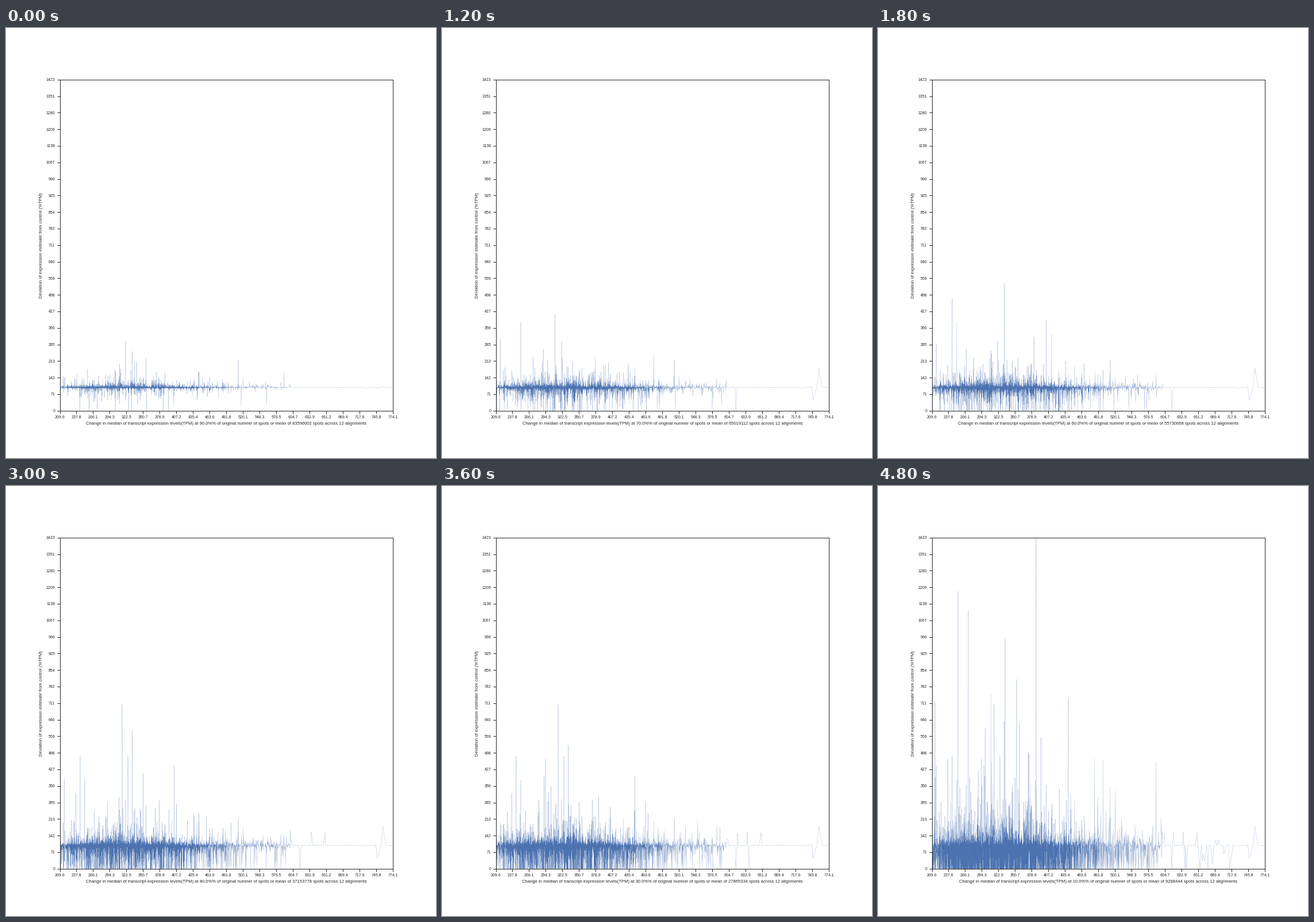
Recreate the animation shown at these times as a matplotlib script. Size 748 by 748 pixels, loop 5400 ms.

```python
import numpy as np
import matplotlib.pyplot as plt
from matplotlib.animation import FuncAnimation

SIZE, DPI = 748, 100
PT = 72 / DPI                 # points per stage pixel
SPOTS = 92884447
X0, X1 = 93.5, 673.2          # plot edges in stage pixels
X_MIN, X_STEP = 209.612, 28.222
Y_STEP = 71.128
Y_MAX = 20 * Y_STEP
PX = 0.77 * SIZE / Y_MAX      # pixels per unit of deviation
FLOOR = 100 * PX              # pixels from the 100 % line down to zero
INK, BLUE = "0.15", "#4C72B0"

plt.rcParams["font.family"] = "Liberation Sans"

# Tallest peaks: x, tenths of the spots at which it appears, height in pixels
PEAKS = [(208, 9, 80), (404, 9, 48), (137, 7, 113), (129, 6, 155),
         (212, 5, 155), (202, 4, 245), (180, 3, 150), (99, 2, 250),
         (246, 2, 214), (139, 1, 442), (157, 1, 408), (221, 1, 359),
         (241, 1, 289), (275, 1, 535), (331, 1, 257)]

rng = np.random.default_rng(12)


def spread(nodes, density):
    """Positions whose count per pixel follows the given profile."""
    grid = np.linspace(nodes[0], nodes[-1], 2000)
    total = np.cumsum(np.interp(grid, nodes, density)) * (grid[1] - grid[0])
    n = int(total[-1])
    return np.interp(np.arange(n) + rng.random(n), total, grid)


crowd = spread([95, 120, 180, 240, 300, 350, 400, 495],
               [10, 18, 24, 22, 15, 9, 5, 3])
tail = spread([496, 560, 600, 672.5], [0.7, 0.45, 0.3, 0.2])
tail[-1] = 672.5
xs = np.concatenate([crowd, tail, [p[0] for p in PEAKS]])
order = np.argsort(xs, kind="stable")

n, m = len(crowd), len(tail)
swing = rng.normal(size=n)
down = rng.random(n) < 0.6
local = np.interp(crowd, [95, 140, 350, 495], [0.6, 1, 1, 0.3])
ripple = rng.normal(size=m) * 0.5
onset = rng.random(m)
jump = np.where(rng.random(m) < 0.72, -60, 35) * rng.uniform(0.2, 1, m)


def profile(k):
    """Deviation of every transcript with k tenths of the spots kept."""
    noise = np.random.default_rng(100 + k)
    growth = 3 * np.sqrt((10 - k) / k)      # sampling error, 1 to 9
    z = 0.85 * swing + 0.53 * noise.normal(size=n)
    drop = 0.25 * growth ** 2 * local * np.exp(1.83 * z)
    rise = 0.9 * growth ** 0.8 * local ** 0.5 * np.exp(1.35 * z)
    busy = np.where(down, -drop, rise / (1 + rise / 500))
    calm = np.where(onset < 0.03 * growth, jump, ripple)
    tall = [h if k <= start else 0 for _, start, h in PEAKS]
    h = np.maximum(np.concatenate([busy, calm, tall]), -FLOOR)
    return 100 + h[order] / PX


curves = [profile(k) for k in range(9, 0, -1)]

fig = plt.figure(figsize=(SIZE / DPI, SIZE / DPI), dpi=DPI, facecolor="white")
ax = fig.add_axes([0.125, 0.11, 0.775, 0.77])
ax.set_xlim(X0, X1)
ax.set_ylim(0, Y_MAX)
steps = np.arange(21)
ax.set_xticks(X0 + steps * (X1 - X0) / 20,
              [f"{X_MIN + i * X_STEP:.1f}" for i in steps])
ax.set_yticks(steps * Y_STEP, [f"{i * Y_STEP:.0f}" for i in steps])
ax.tick_params(length=4.8 * PT, width=PT, pad=3.5 * PT, labelsize=7.04 * PT,
               color=INK, labelcolor=INK)
for side in ax.spines.values():
    side.set_color(INK)
    side.set_linewidth(PT)

label = dict(size=7.68 * PT, color=INK, labelpad=4 * PT)
ax.set_xlabel("", **label)
ax.set_ylabel("Deviation of expression estimate from control (%TPM)", **label)
line, = ax.plot(xs[order], curves[0], color=BLUE, lw=0.2 * PT)


def draw(i):
    k = 9 - i
    line.set_ydata(curves[i])
    ax.xaxis.label.set_text(
        f"Change in median of transcript expression levels(TPM) at {k * 10:.1f}%% "
        f"of original numner of spots or mean of {SPOTS * k // 10} spots "
        "across 12 alignments")
    return line, ax.xaxis.label


anim = FuncAnimation(fig, draw, frames=9, interval=600, repeat=True,
                     repeat_delay=0)
plt.show()
```
